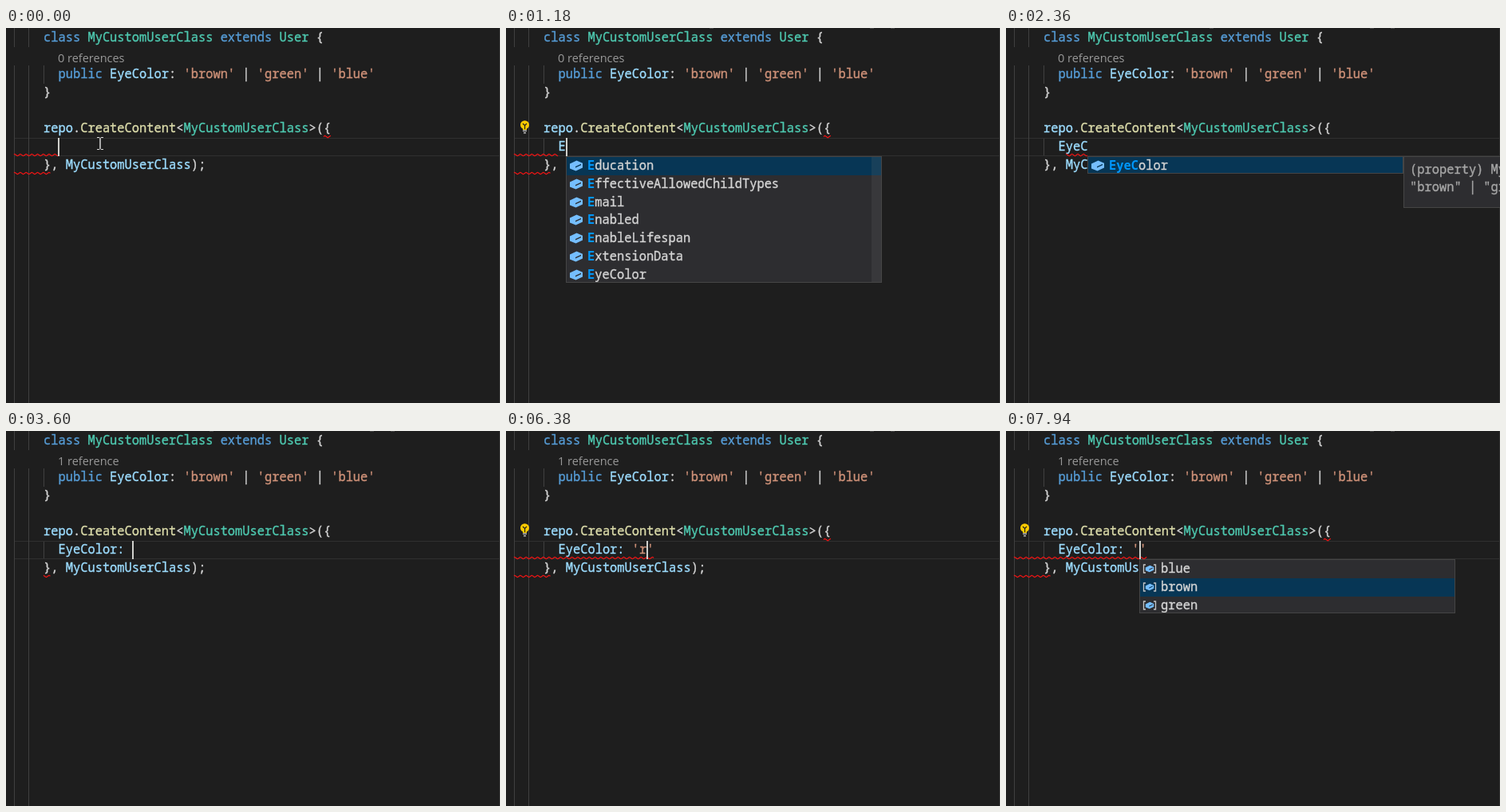
An HTML page with a canvas that plays this animation: 619x471 px, repeating every 8 s.

```html
<!DOCTYPE html>
<html lang="en">
<head>
<meta charset="utf-8">
<title>Typed completion in a code editor</title>
<style>
html, body { margin: 0; width: 100%; height: 100%; overflow: hidden; background: #1e1e1e; }
canvas { display: block; }
</style>
</head>
<body>
<canvas id="stage" width="619" height="471"></canvas>
<script>
const ctx = document.getElementById('stage').getContext('2d');
const LOOP = 8000, CHAR = 9.235, ROW = 22.8, LEFT = 47, INNER = LEFT + 2 * CHAR;
const POP_TOP = 161, POP_WIDTH = 396;
const MONO = '15.4px "Noto Sans Mono", "DejaVu Sans Mono", monospace';
const SANS = '14.5px "Open Sans", "Noto Sans", sans-serif';
const C = {
  back: '#1e1e1e', plain: '#d4d4d4', key: '#569cd6', type: '#4ec9b0', name: '#9cdcfe',
  call: '#dcdcaa', str: '#ce9178', guide: '#404040', popup: '#2d2d30', edge: '#454545',
  pick: '#073655', match: '#0097fb', icon: '#75beff', error: '#f01414'
};

const edits = [
  [0, ''], [1180, 'E'], [1480, 'Ey'], [1550, 'Eye'], [1870, 'EyeC'], [2600, 'EyeColor'],
  [3280, 'EyeColor:'], [3600, 'EyeColor: '], [4290, "EyeColor: ''"], [4600, "EyeColor: 'r'"],
  [4860, "EyeColor: 're'"], [5100, "EyeColor: 'red'"], [6150, "EyeColor: 're'"],
  [6380, "EyeColor: 'r'"], [6550, "EyeColor: ''"]
];
const caretOff = [[460, 940], [2360, 2600], [3120, 3280], [4140, 4290], [5580, 6050], [7060, 7540]];
const members = ['/** */', 'AllowedChildTypes', 'Approvable', 'ApprovingMode', 'Avatar', 'BirthDate',
  'BrowseApplication', 'BrowseUrl', 'Captcha', 'CheckedOutTo', 'CheckInComments', 'CreatedBy'];
const eMembers = ['Education', 'EffectiveAllowedChildTypes', 'Email', 'Enabled', 'EnableLifespan',
  'ExtensionData', 'EyeColor'];

const within = (t, a, b) => t >= a && t < b;

function box(x, y, w, h, color) {
  ctx.fillStyle = color;
  ctx.fillRect(x, y, w, h);
}

function text(str, x, y, color, font = MONO) {
  ctx.font = font;
  ctx.fillStyle = color;
  ctx.fillText(str, x, y);
  if (font === MONO) {  // a hairline stroke gives the slightly heavier editor face
    ctx.strokeStyle = color;
    ctx.lineWidth = 0.35;
    ctx.strokeText(str, x, y);
  }
}

// Draws [text, colour] pairs one after the other on the character grid.
function code(x, y, ...parts) {
  for (const [str, color] of parts) {
    text(str, x, y, color);
    x += str.length * CHAR;
  }
}

function shape(points, fill, stroke, width = 1) {
  ctx.beginPath();
  points.forEach(([x, y]) => ctx.lineTo(x, y));
  if (fill) { ctx.closePath(); ctx.fillStyle = fill; ctx.fill(); }
  if (stroke) { ctx.strokeStyle = stroke; ctx.lineWidth = width; ctx.stroke(); }
}

function squiggle(x1, x2, base) {
  const points = [];
  for (let x = x1; x <= x2; x += 0.6) {
    const phase = (x % 7.2) / 7.2;
    points.push([x, base + 4.2 + 2.6 * Math.abs(2 * phase - 1)]);
  }
  shape(points, null, C.error, 1.2);
}

function cube(x, y, scale, back) {
  ctx.save();
  ctx.translate(x, y);
  ctx.scale(scale, scale);
  shape([[-8, -2.5], [0.5, -6.5], [8, -3.2], [8, 2.6], [-0.5, 6.5], [-8, 3.4]], C.icon);
  shape([[-1, 0.9], [6, -2.3], [6, -0.7], [-1, 2.5]], back);
  ctx.restore();
}

function icon(kind, x, y, back) {
  if (kind === 'field') cube(x, y, 1, back);
  if (kind === 'value') {
    cube(x, y, 0.65, back);
    for (const s of [-1, 1])
      shape([[x + s * 5, y - 5], [x + s * 7.5, y - 5], [x + s * 7.5, y + 5], [x + s * 5, y + 5]], null, '#c5c5c5', 1.3);
  }
  if (kind === 'snippet') {
    box(x - 7, y - 6, 14, 13, '#2b282e');
    shape([[x - 6.5, y + 5], [x - 6.5, y - 6], [x + 6.5, y - 6], [x + 6.5, y + 5]], null, '#c5c5c5', 1.2);
    for (let i = -7; i < 7; i += 3) box(x + i, y + 6, 1.6, 1.4, '#c5c5c5');
  }
}

function frame(x, w, h) {
  ctx.strokeStyle = C.edge;
  ctx.lineWidth = 1;
  ctx.strokeRect(x + 0.5, POP_TOP + 0.5, w - 1, h - 1);
}

function popup(x, items, { kind = 'field', picked = 0, typed = '', details = [], bar = false }) {
  const height = Math.floor(items.length * ROW);
  const rowTop = i => Math.round(POP_TOP + 1 + i * ROW);
  x = Math.round(x);
  box(x, POP_TOP, POP_WIDTH, height, C.popup);
  items.forEach((item, i) => {
    const top = rowTop(i), back = i === picked ? C.pick : C.popup;
    if (i === picked) box(x, top, POP_WIDTH, Math.min(rowTop(i + 1), POP_TOP + height) - top, back);
    icon(item[0] === '/' ? 'snippet' : kind, x + 13, top + 11, back);
    text(item.slice(typed.length), x + 27 + typed.length * CHAR, top + 16, C.plain);
    text(typed, x + 27, top + 16, C.match, 'bold ' + MONO);
  });
  if (bar) box(x + POP_WIDTH - 13, POP_TOP, 13, height, 'rgba(121,121,121,.15)');
  frame(x, POP_WIDTH, height);
  if (details.length) {
    const side = x + POP_WIDTH, h = 21 + details.length * 22;
    box(side, POP_TOP, 619 - side, h, C.popup);
    frame(side, 200, h);
    details.forEach((line, i) => text(line, side + 8, 183 + i * 22, '#a6a6a6'));
  }
}

function bulb() {
  ctx.beginPath();
  ctx.arc(23.5, 121.7, 5.5, 0, 7);
  ctx.fillStyle = '#fc0';
  ctx.fill();
  box(21, 125, 5, 3, '#fc0');
  shape([[21, 120], [23.5, 122.5], [26, 120]], null, C.back, 1.2);
  box(23, 122, 1.2, 5, C.back);
  box(21, 128.5, 5, 1.4, '#c5c5c5');
  box(22, 131, 3, 1.4, '#c5c5c5');
}

function beam(x, y) {
  const half = [[-4, -7.5], [-1, -7.5], [0, -6.5], [0, 6.5], [-1, 7.5], [-4, 7.5]];
  for (const s of [-1, 1]) shape(half.map(([a, b]) => [x + s * a, y + b]), null, '#d8d8d8', 1);
}

function hand(x, y) {
  const outline = [[-4, -10], [-2.5, -11.5], [-1, -10], [-1, -3.5], [1.5, -4], [2.5, -3], [5, -3], [5.5, -2],
    [7.5, -1.5], [8, 0], [8, 5], [6, 9], [6, 11.5], [-3, 11.5], [-3, 9], [-8, 2], [-8, 0], [-6.5, -0.5], [-4, 2], [-4, -10]];
  shape(outline.map(([a, b]) => [x + a, y + b]), '#fff', '#111', 1);
  for (const dx of [-0.5, 2.5, 5]) box(x + dx, y - 2, 0.8, 4, '#333');
}

function background(t) {
  box(0, 0, 619, 471, C.back);
  box(10, 138, 609, 1, '#303030');
  box(10, 160, 609, 1, '#303030');
  for (const x of [10, 28]) {
    box(x, 0, 1, 24, C.guide);
    box(x, 47, 1, 424, C.guide);
  }
  box(47, 47, 1, 23, C.guide);
  if (t >= 1180) {
    box(47, 139, 1, 21, C.guide);
    for (const x of [255, 456, 482]) box(x, 0, 5, 1, '#444');
  }
  box(618, 0, 1, 471, '#303030');

  code(LEFT, 17, ['class ', C.key], ['MyCustomUserClass ', C.type], ['extends ', C.key], ['User ', C.type], ['{', C.plain]);
  text(t < 3120 ? '0 references' : '1 reference', 65, 43, '#999', SANS);
  code(INNER, 63, ['public ', C.key], ['EyeColor', C.name], [': ', C.plain], ["'brown'", C.str], [' | ', C.plain],
    ["'green'", C.str], [' | ', C.plain], ["'blue'", C.str]);
  text('}', LEFT, 86, C.plain);
  code(LEFT, 131, ['repo', C.name], ['.', C.plain], ['CreateContent', C.call], ['<', C.plain],
    ['MyCustomUserClass', C.type], ['>({', C.plain]);
  code(LEFT, 177, ['}, ', C.plain], ['MyCustomUserClass', C.name], [');', C.plain]);
}

function errors(t, typed) {
  if (t < 1550 || t >= 4700) {
    squiggle(LEFT + 38 * CHAR, LEFT + 39 * CHAR, 131);
    squiggle(10, t < 1550 ? INNER : INNER + typed.length * CHAR, 154);
    squiggle(10, 56, 177);
  }
  if (within(t, 2200, 2960)) squiggle(75, 102, 154);
  if (within(t, 2960, 3600)) squiggle(65, 140, 154);
  if (within(t, 3600, 4700)) squiggle(47, 56, 177);
  if (within(t, 340, 1550) || t >= 4700) bulb();
}

function suggestions(t, typed, caretX) {
  if (within(t, 230, 1180)) popup(caretX, members, { details: t < 340 ? [] : ['JSDoc comment'] });
  if (within(t, 1180, 1480))
    popup(caretX, eMembers, { typed, bar: t < 1240, details: t < 1240 ? [] : ['(property) User.Education'] });
  if (within(t, 1480, 2600)) {
    const ready = within(t, 1630, 1870) || t >= 1930;
    popup(caretX, ['EyeColor'], {
      typed, details: ready ? ['(property) MyCustomUserClass.EyeColor', '"brown" | "green" | "blue"'] : []
    });
  }
  if (t >= 6910) popup(caretX, ['blue', 'brown', 'green'], { kind: 'value', picked: t < 7940 ? 0 : 1 });
}

function pointer(t) {
  if (t < 170) beam(118, 145);
  else if (t < 230) beam(210, 172);
  else if (t < 340) hand(320, 203);
  else if (t < 1180) hand(420, 231);
}

function draw(t) {
  const typed = edits.filter(([at]) => at <= t).pop()[1];
  const quoted = typed.endsWith("'");
  const caretX = INNER + (typed.length - quoted) * CHAR;
  background(t);
  code(INNER, 154, [typed.slice(0, 10), C.name], [typed.slice(10), C.str]);
  errors(t, typed);
  if (!caretOff.some(([a, b]) => within(t, a, b))) box(Math.round(caretX), 138, 2, 23, '#d0d0cc');
  suggestions(t, typed, caretX);
  pointer(t);
}

const start = performance.now();
function tick() {
  draw((performance.now() - start) % LOOP);
  requestAnimationFrame(tick);
}
tick();
</script>
</body>
</html>
```
